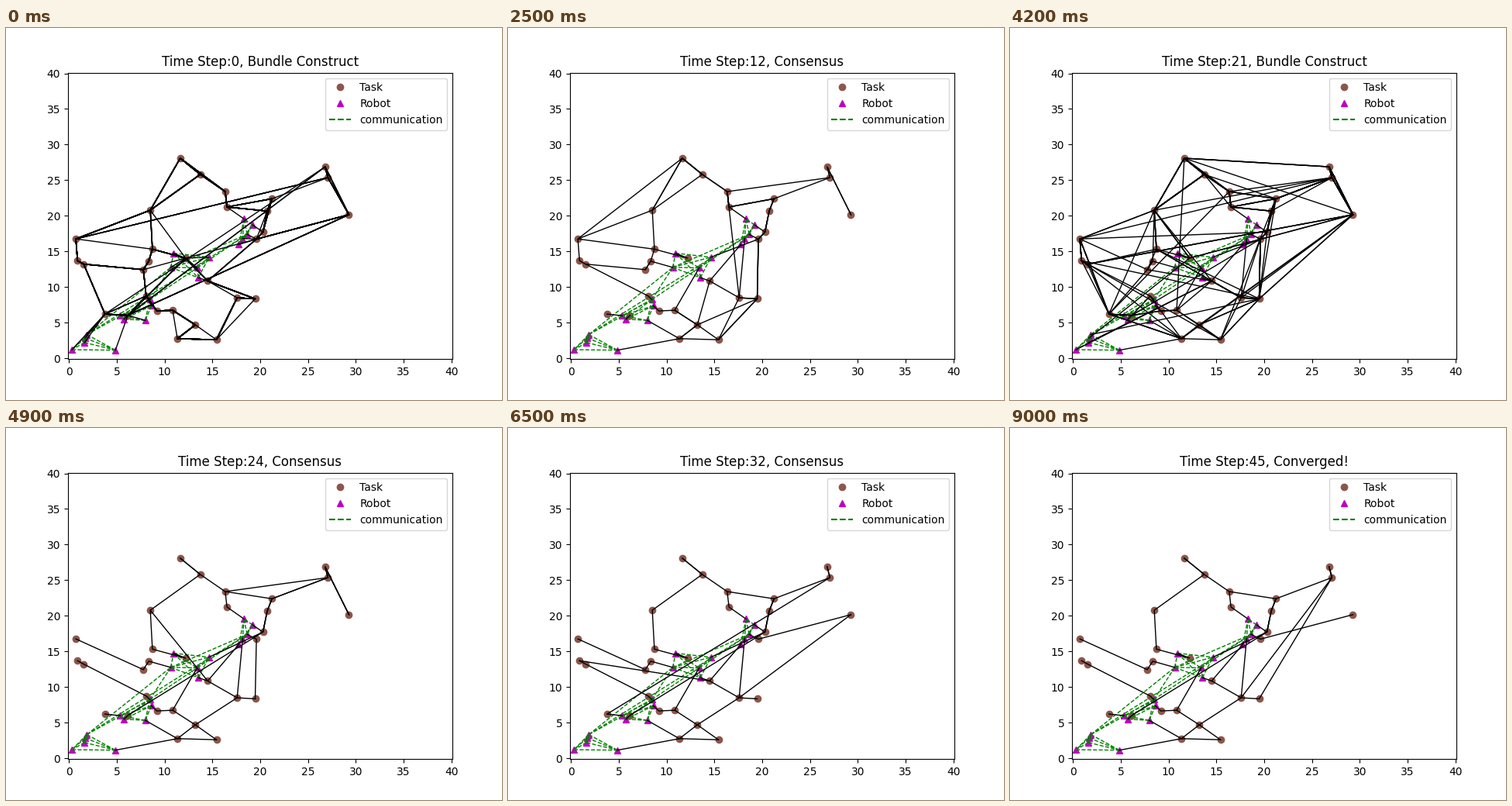
A matplotlib script that plays this animation: 640x480 px, repeating every 9.1 s.

```python
from itertools import combinations

import matplotlib.pyplot as plt
import numpy as np
from matplotlib.animation import FuncAnimation
from matplotlib.lines import Line2D

TASK_NUM = 30
ROBOT_NUM = 20
TEAM_SIZE = 5
ROUNDS = 45
DISCOUNT = 0.95
EPS = np.finfo(float).eps
INTERVAL = 100
KEEP, TAKE, RESET = range(3)

# Tasks fill a 30 x 30 field; each team of robots has its own 5 x 5 square
rng = np.random.RandomState(3)
tasks = rng.uniform(0, 30, (TASK_NUM, 2))
team = np.arange(ROBOT_NUM) // TEAM_SIZE
homes = rng.uniform(0, 5, (ROBOT_NUM, 2)) + 5 * team[:, None]

# Full mesh inside each team, and between the first robots of the teams
links = [(a, b) for a, b in combinations(range(ROBOT_NUM), 2)
         if team[a] == team[b] or a % TEAM_SIZE == b % TEAM_SIZE == 0]


class Robot:
    """One bidder of the consensus-based bundle algorithm."""

    def __init__(self, id):
        self.id = id
        self.home = homes[id]
        self.peers = [a + b - id for a, b in links if id in (a, b)]
        self.bids = [0.0] * TASK_NUM
        self.winners = [id] * TASK_NUM
        self.stamps = [0] * ROBOT_NUM
        self.bundle = []
        self.path = []
        self.clock = 0

    def gains(self):
        """Best marginal score of every task and where to insert it."""
        stops = np.vstack([self.home, tasks[self.path]])
        legs = np.linalg.norm(np.diff(stops, axis=0), axis=1)
        arrival = np.append(0, np.cumsum(legs))
        value = DISCOUNT ** arrival[1:]
        rest = np.append(np.cumsum(value[::-1])[::-1], 0)
        reach = np.linalg.norm(stops[:, None] - tasks, axis=2)
        detour = reach.copy()
        detour[:-1] += reach[1:] - legs[:, None]
        gain = (DISCOUNT ** (arrival[:, None] + reach)
                + rest[:, None] * (DISCOUNT ** detour - 1))
        return gain.max(axis=0), gain.argmax(axis=0)

    def build_bundle(self):
        while len(self.bundle) < TASK_NUM:
            score, place = self.gains()
            score[self.bundle] = 0
            score[score <= self.bids] = 0
            if score.max() <= 0:
                break
            j = int(score.argmax())
            self.bundle.append(j)
            self.path.insert(int(place[j]), j)
            self.bids[j] = float(score[j])
            self.winners[j] = self.id

    def message(self):
        return self.bids[:], self.winners[:], self.stamps

    def verdict(self, j, k, bids, winners, stamps):
        """Decision table for task j on hearing from robot k."""
        i, mine, theirs = self.id, self.winners[j], winners[j]
        higher = bids[j] > self.bids[j]
        tie = abs(bids[j] - self.bids[j]) < EPS
        third = mine not in (i, k, -1)

        def newer(m):
            return stamps[m] > self.stamps[m]

        if theirs == k:
            better = higher or (tie and k < i)
            take = better if mine == i else not third or newer(mine) or better
            return TAKE if take else KEEP
        if theirs == i:
            return RESET if mine == k or (third and newer(mine)) else KEEP
        if theirs == -1:
            return TAKE if mine == k or (third and newer(mine)) else KEEP

        better = higher or (tie and theirs < i)
        if mine == i:
            take = stamps[theirs] >= self.stamps[theirs] and better
        elif mine == k:
            return TAKE if newer(theirs) else RESET
        elif mine in (theirs, -1):
            take = newer(theirs)
        else:
            older = self.stamps[theirs] > stamps[theirs]
            take = (newer(theirs) and (newer(mine) or better)
                    or newer(mine) and older)
        return TAKE if take else KEEP

    def consensus(self, pool):
        for m in range(ROBOT_NUM):
            if m == self.id or m in self.peers:
                self.stamps[m] = self.clock
            else:
                self.stamps[m] = max(pool[k][2][m] for k in self.peers)

        for j in range(TASK_NUM):
            for k in self.peers:
                action = self.verdict(j, k, *pool[k])
                if action == TAKE:
                    self.bids[j], self.winners[j] = pool[k][0][j], pool[k][1][j]
                elif action == RESET:
                    self.bids[j], self.winners[j] = 0.0, -1

        # Everything bid after the first lost task is released
        lost = [n for n, j in enumerate(self.bundle) if self.winners[j] != self.id]
        if lost:
            for j in self.bundle[lost[0] + 1:]:
                self.bids[j], self.winners[j] = 0.0, -1
            del self.bundle[lost[0]:]
        self.path = self.bundle[:]
        self.clock += 1


def simulate():
    """Title and robot paths of every frame."""
    robots = [Robot(i) for i in range(ROBOT_NUM)]
    frames = []

    def record(step, phase):
        frames.append((f"Time Step:{step}, {phase}", [r.path[:] for r in robots]))

    for step in range(ROUNDS):
        for r in robots:
            r.build_bundle()
        record(step, "Bundle Construct")
        pool = [r.message() for r in robots]
        for r in robots:
            r.consensus(pool)
        record(step, "Consensus")
    record(ROUNDS, "Converged!")
    return frames


frames = simulate()

fig, ax = plt.subplots(figsize=(6.4, 4.8), dpi=100)
ax.set_xlim(-0.1, 40.1)
ax.set_ylim(-0.1, 40.1)
ax.plot(*tasks.T, "o", color="tab:brown", label="Task")
ax.plot(*homes.T, "m^", label="Robot")
for a, b in links:
    ax.plot(*homes[[a, b]].T, "g--", lw=1)

handles, _ = ax.get_legend_handles_labels()
handles.append(Line2D([], [], color="g", ls="--", label="communication"))
ax.legend(handles=handles, loc="upper right")

title = ax.set_title("")
lines = [ax.plot([], [], "k-", lw=1)[0] for _ in homes]


def update(k):
    text, paths = frames[k]
    title.set_text(text)
    for line, home, path in zip(lines, homes, paths):
        points = np.vstack([home, tasks[path]]) if path else np.empty((0, 2))
        line.set_data(*points.T)
    return [title, *lines]


anim = FuncAnimation(fig, update, frames=len(frames), interval=INTERVAL,
                     repeat=True, repeat_delay=0, blit=False)
plt.show()
```
